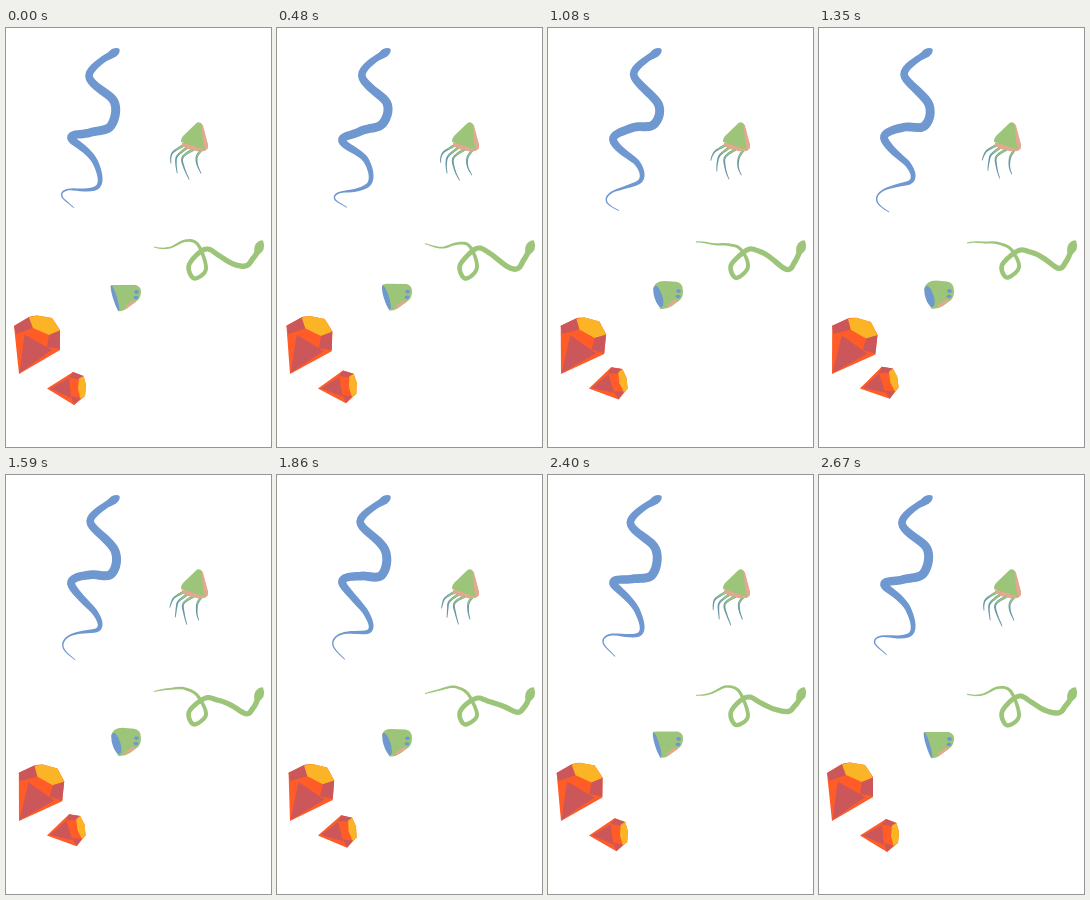
Animation of 265x419 px, one loop 2.7 s. Source, as an HTML page:

```html
<!DOCTYPE html>
<html lang="en">
<head>
<meta charset="utf-8">
<title>Snakes, gems and jellyfish</title>
<style>
html, body { margin: 0; width: 100%; height: 100%; overflow: hidden; background: #fff; }
svg { display: block; width: 100vw; height: 100vh; }
.blue { fill: #6f97d0; }
.green { fill: #9dc579; }
.pink { fill: #e5a78f; }
.teal { fill: #6697a3; }
.orange { fill: #ff5c27; }
.red { fill: #cc575a; }
.yellow { fill: #fbb426; }
</style>
</head>
<body>
<svg viewBox="0 0 265 419" xmlns="http://www.w3.org/2000/svg">
  <path id="blueBody" class="blue"/>
  <path class="blue" d="M100 31Q101 24 106 21Q111 19 113.5 21Q114.500 25 110 28.500Q106 31 100 33Z"/>

  <path id="greenBody" class="green"/>
  <path class="green" d="M249.500 228Q246.500 221 250 215.500Q254 211.500 257 212.500Q259 217 257.500 221.500Q255 226 249.500 228Z"/>

  <g id="arms" class="teal"></g>
  <g id="armTops" class="green"></g>
  <path class="pink" d="M176 115Q176 120 180 119Q183 123 187 121Q191 125 194 122Q198 125 201 121L190 113Z"/>
  <path class="green" d="M175 114Q174.500 111 177 108L190 95.500Q193 93 196 96L202 117Q202.500 122 198 121.500Z"/>
  <path class="pink" d="M195.500 96L197 97.500L202 117Q202.500 122 199 121.500L197 113Z"/>

  <path id="cup" class="green"/>
  <path id="lip" class="pink" d="M118.500 278.500L127 272.500L130 274L119.500 281Z"/>
  <ellipse id="mouth" class="blue"/>
  <g id="spots" class="blue">
    <ellipse cx="130.500" cy="264" rx="2.300" ry="1.900"/>
    <ellipse cx="130" cy="269.500" rx="2.400" ry="1.800"/>
  </g>

  <g id="bigGem">
    <path class="orange" d="M8 298L24 288.500L31 287.500L46 290L54 302L54 322L13 346Z"/>
    <path class="red" d="M8 298L23 289L27 300L10 306Z"/>
    <path class="yellow" d="M23 289.500L31 287.500L46 290L54 302.500L43 307L27 300Z"/>
    <path class="red" d="M43 307L54 302.500L54 321L41 319Z"/>
    <path class="red" d="M18.500 306.500L46 322L13.500 345Z"/>
  </g>
  <g id="smallGem">
    <path class="orange" d="M41 360.500L67 344L77.500 348L80 357L79 368L68 377Z"/>
    <path class="red" d="M67 344L77.500 348L73 351.500L63 349.500Z"/>
    <path class="yellow" d="M73 350.500L77.500 348L80 357L79 368L74.500 371L72 361Z"/>
    <path class="red" d="M44 360.500L63 350L65 370Z"/>
    <path class="red" d="M65 368L74.500 370.500L68 377Z"/>
  </g>
</svg>
<script>
const LOOP = 2700, STEP = 30, TAU = Math.PI * 2;
const { sin, cos, min, max, abs, PI } = Math;
const $ = id => document.getElementById(id);
const mix = (a, b, p) => a + (b - a) * p;
const set = (id, attrs) => Object.entries(attrs).forEach(([k, v]) => $(id).setAttribute(k, v));

const spline = (a, b, c, d, u) => b + 0.5 * u * (c - a +
  u * (2 * a - 5 * b + 4 * c - d + u * (3 * (b - c) + d - a)));

// Smooth line through the key points, as [x, y, u] with u the share of its length.
function spine(text) {
  const pts = text.split(" ").map(p => p.split(",").map(Number));
  const at = i => pts[max(0, min(pts.length - 1, i))];
  const out = [];
  for (let i = 0; i < pts.length - 1; i++)
    for (let j = 0; j < 10; j++)
      out.push([0, 1].map(k => spline(at(i - 1)[k], at(i)[k], at(i + 1)[k], at(i + 2)[k], j / 10)));
  out.push(at(pts.length - 1));
  let len = 0;
  const dist = out.map((p, i) => i ? len += Math.hypot(p[0] - out[i - 1][0], p[1] - out[i - 1][1]) : 0);
  return out.map(([x, y], i) => [x, y, dist[i] / len]);
}

// Filled band around a line; width(u) gives its thickness.
function ribbon(pts, width) {
  const left = [], right = [];
  pts.forEach(([x, y, u], i) => {
    const a = pts[max(0, i - 1)], b = pts[min(pts.length - 1, i + 1)];
    const dx = b[0] - a[0], dy = b[1] - a[1];
    const k = width(u) / 2 / (Math.hypot(dx, dy) || 1);
    left.push([x - dy * k, y + dx * k]);
    right.unshift([x + dy * k, y - dx * k]);
  });
  return "M" + left.concat(right).map(p => p.map(v => v.toFixed(2)).join(" ")).join("L") + "Z";
}

const blueLine = spine("108,24 84,47 109,75 105,98 84,102 65,110 89,135 92,156 63,162 57,171 69,182");
const greenLine = spine("253,221 247,232 238,239 213,226 199,222 183,237 188,250 200,240 192,219 179,214 164,217 148,217");
const tentacles = [
  "178,117 168,123 165,128 164,134",
  "182,119 172,127 170,134 170,144",
  "188,121 177,129 178,140 182,151",
  "196,121 191,129 191,138 194,146"
].map(spine);

// Three ripples run down the blue body while its upper bend sways sideways.
const blueMove = a => ([x, y, u]) => [
  x + 2 * cos(a - 2.2) * max(0, sin(PI * u / 0.4)),
  y + 2.8 * min(1, 2 * u) * cos(a - 3 * TAU * u + 2.44),
  u
];

// The green ripple runs the other way and fades in the loop.
const greenMove = a => ([x, y, u]) => [
  x,
  y + 3.2 * min(1, 8 * u) * abs(cos(PI * u)) * cos(a + 2.8 * TAU * u - 4.14),
  u
];

const armMove = (a, i) => ([x, y, u]) => [
  x + 1.2 * u * sin(a - 4 * u - i * 0.4),
  y + 1.6 * u * cos(a - i * 0.6),
  u
];

const blueWidth = u => 4 + 5.2 * sin(PI * min(1, u + 0.12)) - 3.2 * u ** 3;
const greenWidth = u => 5.4 - 4.4 * u ** 2.5;

const addPaths = id => tentacles.map(() =>
  $(id).appendChild(document.createElementNS("http://www.w3.org/2000/svg", "path")));
const arms = addPaths("arms"), armTops = addPaths("armTops");

function drawCup(p) {
  const top = mix(257, 252.5, p), low = mix(283, 280.5, p);
  const x = mix(109, 110.5, p), y = mix(270, 268.5, p);
  set("cup", { d: `M105 ${mix(257, 261, p)}Q${mix(105, 107, p)} ${top} ${mix(108, 117, p)} ${top}
    L${mix(130, 128, p)} ${top + p}Q135 ${top + 2} 135 263Q135 269 132 272
    L124 278Q118 ${low + 1} 112 ${low}Z` });
  set("mouth", { cx: x, cy: y, rx: mix(2, 4.2, p), ry: mix(13.3, 11, p), transform: `rotate(-17 ${x} ${y})` });
  set("spots", { transform: `translate(0 ${-p})` });
  set("lip", { transform: `translate(0 ${-p})` });
}

function draw(t) {
  const a = t / LOOP * TAU, swing = (1 - cos(a)) / 2;
  set("blueBody", { d: ribbon(blueLine.map(blueMove(a)), blueWidth) });
  set("greenBody", { d: ribbon(greenLine.map(greenMove(a)), greenWidth) });
  tentacles.forEach((line, i) => {
    const pts = line.map(armMove(a, i));
    arms[i].setAttribute("d", ribbon(pts, u => 2.8 - 2 * u));
    armTops[i].setAttribute("d", ribbon(pts.filter(p => p[2] < 0.5), u => 2.6 - 5.2 * u));
  });
  drawCup(swing);
  set("bigGem", { transform: `rotate(${6.2 * swing} 13 346)` });
  set("smallGem", { transform: `rotate(${-12.5 * swing} 41 361)` });
}

const start = performance.now();
function tick() {
  const t = (performance.now() - start) % LOOP;
  draw(Math.floor(t / STEP) * STEP);
  requestAnimationFrame(tick);
}
tick();
</script>
</body>
</html>
```
